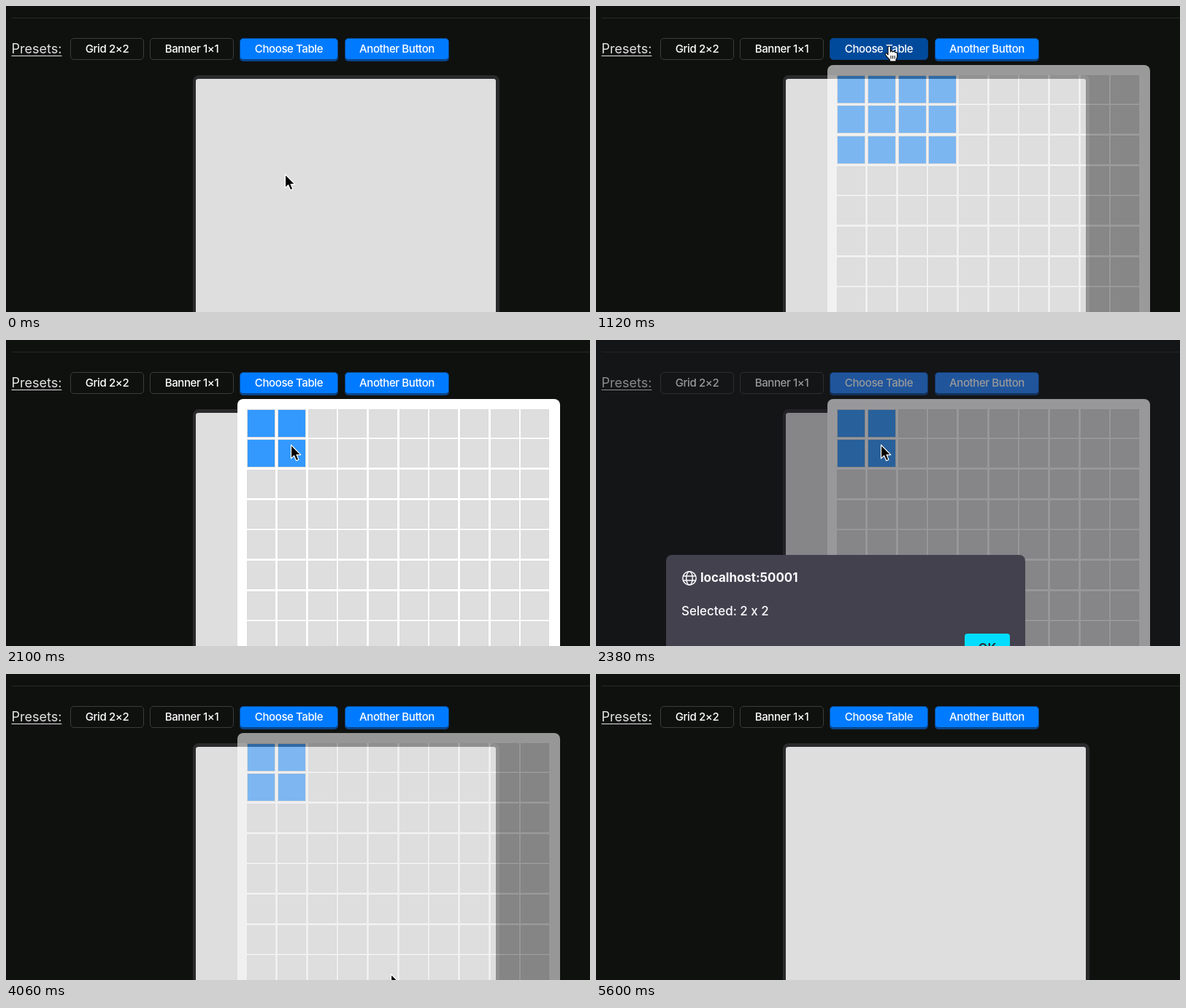
Recreate the animation shown at these times as an HTML page. Size 800 by 420 pixels, loop 5.74 s.

```html
<!DOCTYPE html>
<html lang="en">
<head>
<meta charset="utf-8">
<title>Table picker</title>
<style>
  :root { --loop: 5740ms; }
  html, body { margin: 0; width: 100%; height: 100%; overflow: hidden; background: #0f110f; }
  body { position: relative; font: 400 18px/30px Inter, sans-serif; color: #e3e3e3; }
  body *, body *::before { box-sizing: border-box; }
  body > *, .dialog > * { position: absolute; white-space: nowrap; }

  .rule { left: 8px; right: 0; top: 16px; height: 1px; background: #272927; }
  .label { left: 7.5px; top: 44px; text-decoration: underline; text-underline-offset: 3px; text-decoration-thickness: 1.4px; }
  .btn {
    top: 44px; height: 30px; border: 1px solid #3b3d3b; border-radius: 5px;
    font-size: 15px; font-weight: 500; line-height: 28px; letter-spacing: -.4px;
    text-align: center; color: #fff;
  }
  .blue { background: #007bff; border-color: #0a4386; box-shadow: 0 2px #0a458c; }
  .choose { animation: press var(--loop) step-end infinite; }
  .another { animation: dim var(--loop) step-end infinite; }

  .panel { left: 256px; top: 95px; width: 420px; height: 400px; border: 5px solid #2a2a2c; border-left-width: 4px; border-radius: 8px; background: #dedede; }
  .popup {
    left: 317px; top: 81px; width: 442px; height: 442px; border-radius: 8px; background: #fff;
    animation: popup var(--loop) linear infinite;
  }
  .cell { position: absolute; width: 39px; height: 39px; border: 1px solid #dadada; background: #dedede; }
  .kept { background: #39f; }
  .again { animation: again var(--loop) linear infinite; }
  .dropped { animation: dropped var(--loop) linear infinite; }

  .shade { inset: 0; background: rgba(28, 27, 34, .45); }
  .shade, .dialog { animation: dialog var(--loop) linear infinite; }
  .dialog {
    left: 96px; top: 295px; width: 492px; height: 160px; border-radius: 8px;
    background: #42414d; color: #fbfbfe; font-size: 16.9px; font-weight: 500; line-height: 24px;
  }
  .globe { left: 21px; top: 21px; }
  .host { left: 47px; top: 19px; font-weight: 700; }
  .message { left: 21px; top: 65px; }
  .ok {
    left: 409px; top: 108px; width: 62px; height: 40px; border-radius: 4px;
    font-weight: 600; line-height: 40px; text-align: center; color: #2b2a33;
    animation: ok var(--loop) step-end infinite;
  }

  .cursor { left: 0; top: 0; width: 0; height: 0; animation: move var(--loop) ease-in-out infinite; }
  .cursor svg { position: absolute; overflow: visible; }
  .arrow { top: 1px; animation: arrow var(--loop) step-end infinite; }
  .hand { left: -8px; top: -4px; animation: hand var(--loop) step-end infinite; }

  @keyframes move {
    0%, 1.2% { transform: translate(382px, 230px); }
    11%, 23.2% { transform: translate(403px, 58px); animation-timing-function: linear; }
    26.83% { transform: translate(383px, 141px); animation-timing-function: ease-out; }
    30.5%, 45.1% { transform: translate(390px, 143px); }
    51.2%, 72% { transform: translate(527px, 411px); }
    76.8%, 100% { transform: translate(540px, 445px); }
  }
  @keyframes arrow { 0% { opacity: 1; } 8.7% { opacity: 0; } 24.3%, 100% { opacity: 1; } }
  @keyframes hand { 0% { opacity: 0; } 8.7% { opacity: 1; } 24.3%, 100% { opacity: 0; } }
  @keyframes press {
    0%, 36.6% { background: #007bff; box-shadow: 0 2px #0a458c; }
    17.4% { background: #004a9c; box-shadow: 0 0 #0a458c; }
    37.8% { background: #2585ff; box-shadow: 0 2px #0a458c; }
    68.3%, 100% { background: #007bff; box-shadow: 0 2px #0a458c; }
  }
  @keyframes dim { 0% { background: #007bff; } 37.8% { background: #2585ff; } 68.3%, 100% { background: #007bff; } }
  @keyframes popup {
    0%, 18.01% { opacity: 0; }
    20.63%, 69.62% { opacity: 1; }
    72.23%, 100% { opacity: 0; }
  }
  @keyframes again {
    0%, 23.34% { background: #39f; }
    25.26%, 25.96% { background: #dedede; }
    28.57%, 100% { background: #39f; }
  }
  @keyframes dropped { 0%, 23.34% { background: #39f; } 25.26%, 100% { background: #dedede; } }
  @keyframes dialog {
    0%, 37.8% { opacity: 0; }
    39.5%, 68.28% { opacity: 1; }
    68.29%, 100% { opacity: 0; }
  }
  @keyframes ok { 0% { background: #0df; } 50.6% { background: #80ebff; } 64.6%, 100% { background: #aaf2ff; } }
</style>
</head>
<body>
  <div class="rule"></div>
  <div class="label">Presets:</div>
  <div class="btn" style="left:88px;width:101px">Grid 2×2</div>
  <div class="btn" style="left:197px;width:115px">Banner 1×1</div>
  <div class="btn blue choose" style="left:320px;width:135px">Choose Table</div>
  <div class="btn blue another" style="left:464px;width:143px">Another Button</div>
  <div class="panel"></div>
  <div class="popup"></div>
  <div class="shade"></div>
  <div class="dialog">
    <svg class="globe" width="22" height="22" fill="none" stroke="#fbfbfe" stroke-width="1.5">
      <circle cx="11" cy="11" r="9.2"/>
      <ellipse cx="11" cy="11" rx="4.3" ry="9.2"/>
      <path d="M2.5 8H19.5M2.5 14H19.5"/>
    </svg>
    <div class="host">localhost:50001</div>
    <div class="message">Selected: 2 x 2</div>
    <div class="ok">OK</div>
  </div>
  <div class="cursor">
    <svg class="arrow" width="18" height="26">
      <path d="M.5 0V18.6L4.7 14.8L7.5 21.6L10.9 20.2L8.1 13.6H13.8Z" fill="#000" stroke="#fff" stroke-width="1.2" stroke-linejoin="round"/>
    </svg>
    <svg class="hand" width="20" height="24">
      <path d="M5 13V3Q5 1 6.7 1T8.4 3V9Q8.6 7.6 10 7.6T11.6 9.2Q12 8.2 13.3 8.3T14.8 10Q15.3 9.3 16.4 9.6T17.6 11.4V15Q17.6 17.5 16 19.5V22H7.5V20Q4 16.5 1.3 12.8Q.6 11.4 1.8 10.8T5 13Z" fill="#fff" stroke="#000" stroke-width="1.1" stroke-linejoin="round"/>
      <path d="M9 14V18.5M11.6 14V18.5M14.2 14V18.5" stroke="#000"/>
    </svg>
  </div>
<script>
  const popup = document.querySelector('.popup');
  const pitch = 41.67;

  function kind(row, col) {
    if (row > 2 || col > 3) return '';
    if (row > 1 || col > 1) return 'dropped';
    return row ? 'again' : 'kept';
  }

  for (let row = 0; row < 10; row++) {
    for (let col = 0; col < 10; col++) {
      const cell = document.createElement('div');
      cell.className = `cell ${kind(row, col)}`;
      cell.style.left = `${13.4 + col * pitch}px`;
      cell.style.top = `${13.5 + row * pitch}px`;
      popup.append(cell);
    }
  }
</script>
</body>
</html>
```
